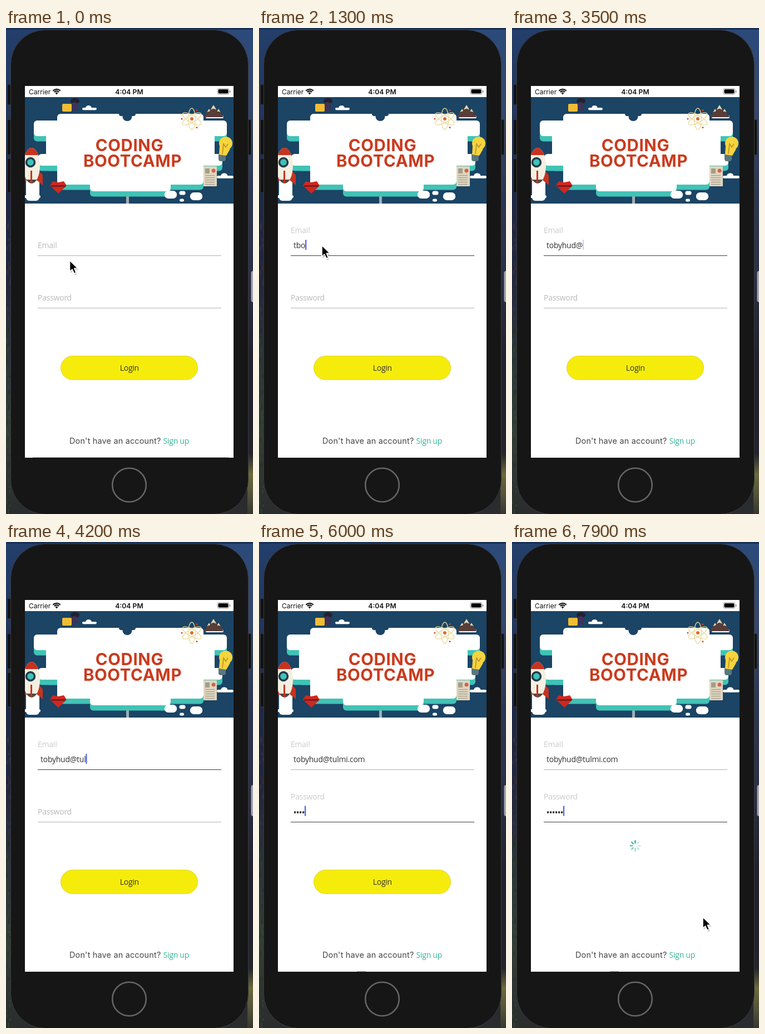
An HTML page with a canvas that plays this animation: 444 by 872 pixels, repeating every 8000 ms.

```html
<!DOCTYPE html>
<html lang="en">
<head>
<meta charset="utf-8">
<title>Login screen</title>
<style>
html, body { margin: 0; width: 100%; height: 100%; overflow: hidden; background: #17264a; }
canvas, svg { position: absolute; left: 0; top: 0; width: 444px; height: 872px; }
text { font: 14px "Open Sans", "Noto Sans", sans-serif; fill: #333; letter-spacing: -.25px; }
.ui { font-family: Inter, Roboto, sans-serif; letter-spacing: 0; }
.mid { text-anchor: middle; }
.title { font-size: 29.5px; font-weight: 700; fill: #cb3a1d; letter-spacing: .6px; }
</style>
</head>
<body>
<canvas id="stage" width="444" height="872"></canvas>
<svg viewBox="0 0 444 872">
  <text class="ui" x="41" y="119" style="font-size:12px;fill:#111">Carrier</text>
  <text class="ui mid" x="221.5" y="119" style="font-size:12.2px;font-weight:600;fill:#111">4:04 PM</text>
  <text class="ui mid title" x="222" y="221">CODING</text>
  <text class="ui mid title" x="227.5" y="248.5">BOOTCAMP</text>
  <text id="mailLabel" x="57" y="395">Email</text>
  <text id="passLabel" x="57" y="489">Password</text>
  <text id="mail" x="62" y="395"></text>
  <text id="pass" x="62" y="490" style="font-weight:600"></text>
  <rect id="caret" width="2" height="18" fill="#3f5bd8"/>
  <text id="login" class="mid" x="221.8" y="615">Login</text>
  <text class="ui" x="114" y="746" style="font-size:14.4px;fill:#444;letter-spacing:.2px">Don't have an account?</text>
  <text x="282.5" y="746" style="fill:#2db597">Sign up</text>
  <g id="pointer">
    <path d="M1.5 3V23L6 19L9.500 26.500L13 25L9.800 17.300H16Z" opacity=".2"/>
    <path d="M0 0V20L4.500 16L8 23.500L11.500 22L8.300 14.300H14.500Z" stroke="#fff" stroke-width="1.6" stroke-linejoin="round"/>
  </g>
</svg>
<script>
const LOOP = 8000, FOCUS_MAIL = 500, FOCUS_PASS = 5250, LOADING = 7300;
const MAIL = 'tobyhud@tulmi.com', TYPO = 'tbo';
const NAVY = '#1b4465', TEAL = '#40c3b6', RED = '#c8321f';
const $ = id => document.getElementById(id);
const c = $('stage').getContext('2d');

// Key points: time, value(s)
const letters = [[800, 0], [1250, 3], [1500, 3], [1700, 1], [1850, 1], [2250, 4],
  [2500, 4], [3300, 8], [3600, 8], [5050, MAIL.length]];
const dots = [[5400, 0], [6200, 6]];
const pointer = [[0, 114.5, 417], [400, 113, 390], [6450, 113, 390],
  [7000, 250, 608], [7250, 250, 608], [7650, 343, 673]];

const clamp = v => Math.max(0, Math.min(1, v));
const ease = v => { v = clamp(v); return v * v * (3 - 2 * v); };

function track(points, t, curve = clamp) {
  let i = 0;
  while (i < points.length - 2 && t > points[i + 1][0]) i++;
  const [t0, ...a] = points[i], [t1, ...b] = points[i + 1];
  const k = curve((t - t0) / (t1 - t0));
  return a.map((v, n) => v + (b[n] - v) * k);
}

function rect(x, y, w, h, color) { c.fillStyle = color; c.fillRect(x, y, w, h); }
function paint(fill, stroke, width = 1) {
  if (fill) { c.fillStyle = fill; c.fill(); }
  if (stroke) { c.strokeStyle = stroke; c.lineWidth = width; c.stroke(); }
}
function round(x, y, w, h, r, fill, stroke, width) {
  c.beginPath(); c.roundRect(x, y, w, h, r); paint(fill, stroke, width);
}
function oval(x, y, rx, ry, fill, stroke, width, turn = 0) {
  c.beginPath(); c.ellipse(x, y, rx, ry, turn, 0, 7); paint(fill, stroke, width);
}
function poly(points, fill) {
  c.beginPath(); points.forEach(p => c.lineTo(...p)); c.closePath(); paint(fill);
}
function cloud(x, y, w) {
  round(x - w / 2, y, w, w * .16, w * .08, '#fff');
  oval(x - w * .06, y, w * .2, w * .15, '#fff');
}

// Even vertical gradient through the given colours
function strip(x, w, y, h, ...colors) {
  const g = c.createLinearGradient(0, y, 0, y + h);
  colors.forEach((color, i) => g.addColorStop(i / (colors.length - 1), color));
  rect(x, y, w, h, g);
}

function wallpaper() {
  strip(0, 222, 0, 872, '#233f6b', '#23365f', '#1c2947', '#22263f', '#2b343a', '#343d36', '#2a2c2e');
  strip(222, 222, 0, 872, '#2b4a7a', '#35476d', '#2c3754', '#2b3048', '#23232f', '#23232c', '#2a2c2e');
  rect(0, 0, 444, 3, '#172f55');
  let seed = 7;
  const rnd = () => (seed = seed * 16807 % 2147483647) / 2147483647;
  for (let i = 0; i < 160; i++) {
    const y = 320 + rnd() * 550, hue = y < 520 ? 230 + (rnd() < .3) * 120 : 120;
    rect(rnd() * 8, y, 1 + rnd() * 2, 2 + rnd() * 8, `hsla(${hue},20%,${14 + rnd() * 14}%,.5)`);
  }
  round(440.500, 436, 8, 56, 4, '#a5a5ae');
  strip(434, 10, 765, 107, 'rgba(110,106,60,0)', '#6d6a3c', '#55543a', '#35382f');
}

function phone() {
  const button = (x, y, h) => round(x + .5, y + .5, 7, h, 2, '#121212', '#33343a');
  button(2, 101, 36);
  button(2, 234, 61);
  for (const x of [2, 433]) button(x, 164, 63);
  round(8.5, 3.500, 427, 869, 62, '#161616', '#3b3c40');
  oval(221.5, 820, 30.3, 30.3, '#161616', '#666', 2.6);
  rect(34, 104, 375, 667, '#fff');
}

function statusBar() {
  const wave = r => { c.beginPath(); c.arc(91, 119, r, -Math.PI * .76, -Math.PI * .24); };
  for (const r of [9.2, 5.800]) { wave(r); paint(null, '#111', 2.2); }
  wave(3.300); c.lineTo(91, 119.5); paint('#111');
  round(380, 108.500, 21, 10.500, 3, null, '#999');
  round(381.500, 110, 18, 7.500, 1.800, '#000');
  round(402, 112, 1.500, 4, 1, '#999');
}

// Sign: overlapping centred slabs given as inset, top, bottom
function board(dy, fill) {
  const slabs = [[0, 166, 194], [8, 226, 247], [22, 166, 247], [42, 154, 281], [101, 154, 293]];
  for (const [inset, top, bottom] of slabs)
    round(50 + inset, top + dy, 347 - inset * 2, bottom - top, 6, fill);
}

function rocket() {
  round(36, 270, 24, 40, 6, '#fff');
  for (const side of [-1, 1])
    poly([[46 + side * 10, 252], [46 + side * 20, 264], [46 + side * 20, 282], [46 + side * 8, 272]], RED);
  oval(46, 247, 15, 32, '#f3efe1');
  c.save(); c.clip();
  rect(30, 212, 36, 16, RED);
  rect(30, 272, 36, 10, '#57463f');
  c.restore();
  oval(44, 241, 7.500, 7.500, TEAL, '#24394a', 3.500);
  rect(44, 256, 3, 22, RED);
}

function peaks() {
  for (const [x, h] of [[365, 15], [382, 15], [373, 22]]) {
    const at = (dx, k) => [x + dx * h, 160 - h * (1 - k)];
    poly([at(0, 0), at(.6, 1), at(-.6, 1)], '#593d37');
    poly([at(0, 0), at(.24, .4), at(0, .3), at(-.24, .4)], '#ead7b6');
  }
}

function atom() {
  for (let i = 0; i < 3; i++) {
    const a = Math.PI / 6 + i * Math.PI / 3;
    oval(334, 163, 19, 6.500, null, '#eadb9c', 1.3, a);
    oval(334 + 18 * Math.cos(a * 2), 163 + 18 * Math.sin(a * 2), 1.500, 1.500, '#d4472c');
  }
  oval(334, 163, 3, 3, '#e2692c');
}

function bulb() {
  round(382, 224, 13, 15, 4, '#5b7680');
  poly([[384, 212], [403, 217], [396, 229], [383, 227]], '#f5d43d');
  oval(395, 207, 12, 12, '#f5d43d');
  c.beginPath(); c.moveTo(389, 226);
  [[391, 208], [395, 214], [399, 208]].forEach(p => c.lineTo(...p));
  paint(null, '#b98a2c', 1.5);
}

function paper() {
  round(355, 248, 24, 36, 1, '#ded6c0');
  rect(358, 252, 8, 9, '#a79c87');
  oval(373, 256, 3.500, 3.500, '#d9604a');
  for (let y = 264; y < 282; y += 4) rect(358, y, 17, 1.2, '#a79c87');
}

function speaker() {
  oval(124, 131, 8, 5, '#25202f');
  oval(123, 141, 7, 8, '#3d3358');
  round(101, 136, 17, 14, 2, '#f0bd35');
}

function banner() {
  c.save();
  c.beginPath(); c.rect(34, 124, 375, 191); c.clip();
  rect(34, 124, 375, 191, NAVY);
  rect(216, 300, 5, 15, '#a5acb2');
  board(9.5, TEAL);
  board(0, '#fff');
  round(203, 148, 30, 10, 4, NAVY);
  oval(218, 159, 8.500, 8, NAVY);
  for (const [x, y, w] of [[150, 143, 26], [375, 157, 32], [394, 265, 30], [46, 300, 32]]) cloud(x, y, w);
  speaker(); peaks(); atom(); bulb(); paper(); rocket();
  // gem
  poly([[79, 283], [84, 275], [94, 277], [104, 275], [109, 283], [94, 297]], '#cf2821');
  rect(81, 282, 26, 3, '#7d1c1c');
  // low puffs
  for (const [x, y, r] of [[296, 299, 7], [342, 302, 7], [317, 296, 3.500], [316, 309, 2.500]])
    round(x - r * 1.6, y - r, r * 3.2, r * 2, r, '#fff');
  c.restore();
}

function spinner(t) {
  const head = Math.floor((t - 7900) / 125);
  c.lineCap = 'round';
  for (let i = 0; i < 8; i++) {
    const age = (((head - i) % 8) + 8) % 8;
    const a = i * Math.PI / 4 - Math.PI / 2, x = Math.cos(a), y = Math.sin(a);
    c.globalAlpha = Math.max(.25, 1 - age * .13);
    c.beginPath();
    c.moveTo(221.5 + x * 5, 545 + y * 5);
    c.lineTo(221.5 + x * 9, 545 + y * 9);
    paint(null, '#2db597', 2.4);
  }
  c.globalAlpha = 1;
}

// Static parts are drawn once and reused
wallpaper(); phone(); statusBar(); banner();
const still = document.createElement('canvas');
still.width = 444; still.height = 872;
still.getContext('2d').drawImage($('stage'), 0, 0);

function label(node, y, k) {
  node.setAttribute('y', y - 27 * k);
  node.style.fill = k > .5 ? '#cbcbcb' : '#b9b9b9';
}

function caret(t, onPass) {
  const node = $('caret'), field = $(onPass ? 'pass' : 'mail'), blink = t % 1000;
  node.setAttribute('x', 62 + field.getComputedTextLength());
  node.setAttribute('y', onPass ? 473.500 : 380);
  node.setAttribute('opacity', t < FOCUS_MAIL ? 0
    : Math.max(clamp((530 - blink) / 100), clamp((blink - 680) / 80)));
}

function draw(t) {
  const onPass = t >= FOCUS_PASS, onMail = t >= FOCUS_MAIL && !onPass;
  const loading = t >= LOADING;
  c.drawImage(still, 0, 0);
  rect(57, 408, 330, 1, onMail ? '#3c3c3c' : '#b2b2b2');
  rect(57, 502, 330, 1, onPass ? '#3c3c3c' : '#b2b2b2');
  if (t < 900) rect(48, 770, 352, 1, '#aaa');
  if (onPass) rect(176, 770, 16, 1, '#aaa');
  if (loading) spinner(t);
  else round(98.500, 588.500, 246, 42.500, 21.25, '#f6ec0b', '#e0d42f');
  $('login').style.display = loading ? 'none' : '';

  label($('mailLabel'), 395, ease((t - FOCUS_MAIL) / 200));
  label($('passLabel'), 489, ease((t - FOCUS_PASS) / 200));
  $('mail').textContent = (t < 1700 ? TYPO : MAIL).slice(0, Math.floor(track(letters, t)[0]));
  $('pass').textContent = '•'.repeat(track(dots, t)[0]);
  caret(t, onPass);

  const [x, y] = track(pointer, t, ease);
  $('pointer').setAttribute('transform', `translate(${x} ${y})`);
  $('pointer').style.display = t < 2600 || t >= 6450 ? '' : 'none';
}

function frame(now) {
  draw(now % LOOP);
  requestAnimationFrame(frame);
}
draw(0);
requestAnimationFrame(frame);
</script>
</body>
</html>
```
